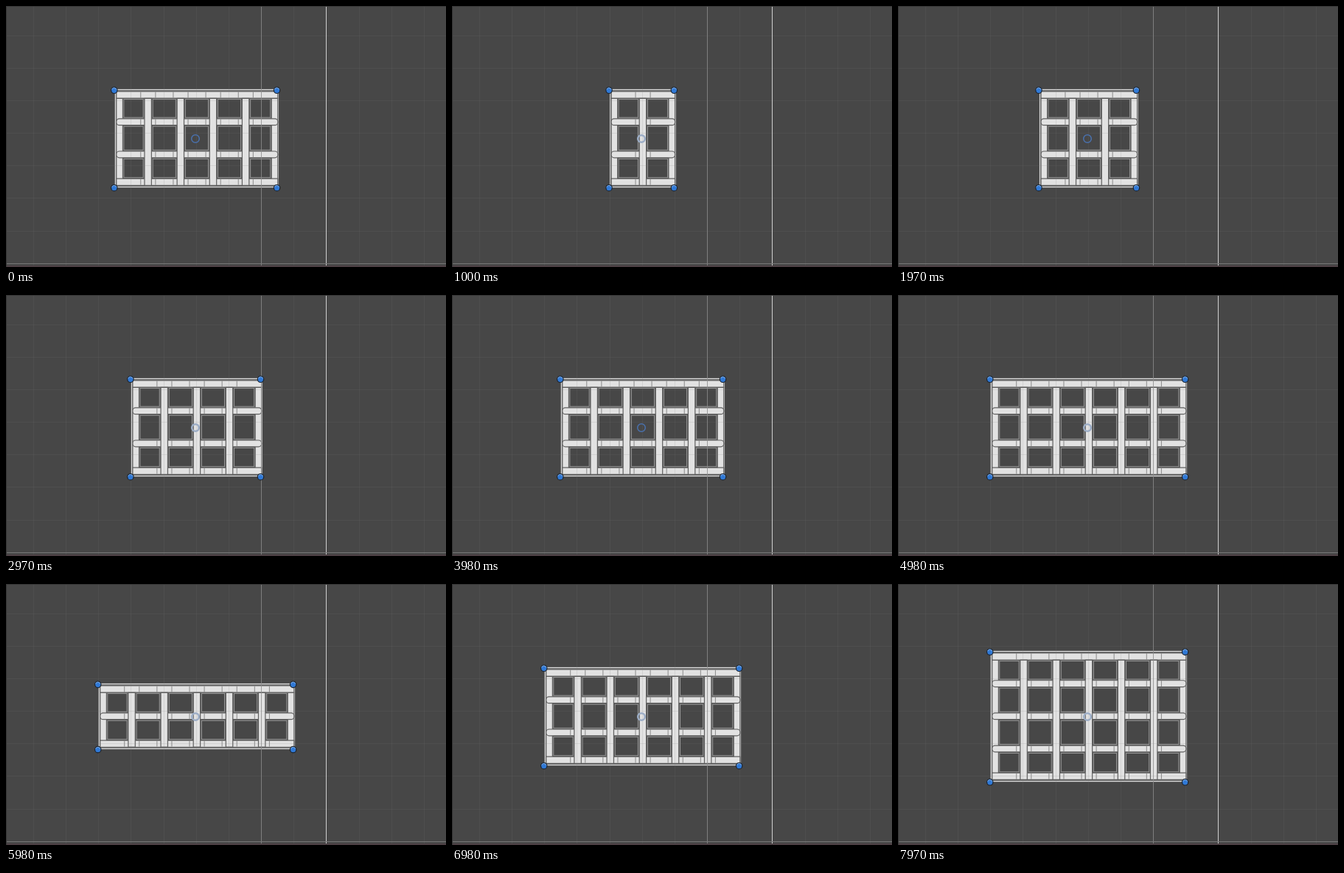
Write an HTML page with a canvas that moves like this. It is 597 px wide and 354 px high and loops after 8 s.

```html
<!DOCTYPE html>
<html>
<head>
<meta charset="utf-8">
<style>
html, body { margin: 0; width: 100%; height: 100%; overflow: hidden; background: #474747; }
canvas { display: block; }
</style>
</head>
<body>
<canvas id="stage" width="597" height="354"></canvas>
<script>
const ctx = document.getElementById('stage').getContext('2d');
const CELL = 44.15, CX = 257.2, CY = 180.5, LOOP = 8000;
const BG = '#474747', WOOD = '#e2e2e2', EDGE = '#606060';

// start time, columns, rows
const steps = [
  [0, 5, 3], [1000, 2, 3], [1970, 3, 3], [2970, 4, 3],
  [3980, 5, 3], [4980, 6, 3], [5980, 6, 2], [6980, 6, 3], [7970, 6, 4]
];

function rect(x, y, w, h, color) {
  ctx.fillStyle = color;
  ctx.fillRect(x, y, w, h);
}

function outline(x, y, w, h, color, width = 1) {
  ctx.strokeStyle = color;
  ctx.lineWidth = width;
  ctx.strokeRect(x, y, w, h);
}

function beam(x, y, w, h, radius = 0) {
  ctx.beginPath();
  ctx.roundRect(x, y, w, h, radius);
  ctx.fillStyle = WOOD;
  ctx.fill();
  ctx.strokeStyle = EDGE;
  ctx.lineWidth = 1.2;
  ctx.stroke();
}

function circle(x, y, r, stroke, width, fill) {
  ctx.beginPath();
  ctx.arc(x, y, r, 0, 2 * Math.PI);
  if (fill) { ctx.fillStyle = fill; ctx.fill(); }
  ctx.strokeStyle = stroke;
  ctx.lineWidth = width;
  ctx.stroke();
}

function grid() {
  const faint = 'rgba(120,120,120,.15)';
  for (let i = 0; i < 13; i++) {
    const x = Math.round(37 + i * CELL);
    if (i !== 7 && i !== 9) rect(x, 0, 1, 354, faint);
  }
  for (let i = 0; i < 7; i++) rect(0, Math.round(39.7 + i * CELL), 597, 1, faint);
  rect(346, 0, 1, 354, 'rgba(140,140,140,.8)');
  rect(434, 0, 1, 354, '#cfcfcf');
  rect(0, 349, 597, 1, '#777');
  rect(0, 352, 597, 2, '#4c4044');
  rect(0, 0, 597, 1, '#363636');
  rect(0, 0, 1, 354, '#363636');
}

function windowFrame(cols, rows) {
  const w = cols * CELL, h = rows * CELL;
  const x0 = CX - w / 2, y0 = CY - h / 2, x1 = x0 + w, y1 = y0 + h;
  const postX = k => x0 + k * CELL + 1.7;
  const railY = k => y0 + k * CELL - 1.2;

  rect(x0 + 1.5, y0 - 1, w + 0.5, h, EDGE);
  outline(x0 + 1.6, y0 - 0.8, w + 0.2, h - 0.4, '#dcdcdc', 1.3);

  // panes
  for (let c = 0; c < cols; c++) for (let r = 0; r < rows; r++) {
    const left = c ? postX(c) + 5.5 : x0 + 12;
    const right = c < cols - 1 ? postX(c + 1) - 5.5 : x1 - 7.8;
    const top = r ? railY(r) + 5 : y0 + 11.2;
    const bottom = r < rows - 1 ? railY(r + 1) - 5 : y1 - 13;
    rect(left, top, right - left, bottom - top, BG);
    outline(left + 1, top + 1, right - left - 2, bottom - top - 2, '#999');
  }

  beam(x0 + 3, y0 + 11, 8.6, h - 14.5);
  beam(x1 - 7.4, y0 + 11, 8.6, h - 14.5);
  beam(x0 + 3, y0 + 1.5, w - 1.8, 9.3);
  beam(x0 + 3, y1 - 12.6, w - 1.8, 9.2);
  for (let r = 1; r < rows; r++) beam(x0 + 3, railY(r) - 4.4, w - 1.8, 8.8, 4);

  for (let c = 1; c < cols; c++) {
    const x = postX(c);
    for (const dx of [-10.4, 9.7]) {
      rect(x + dx, y0 + 2, 1, 8.5, '#8a8a8a');
      rect(x + dx, y1 - 12, 1, 8, '#8a8a8a');
      for (let r = 1; r < rows; r++) rect(x + dx, railY(r) - 4, 1, 8, '#8a8a8a');
    }
    beam(x - 4.7, y0 + 11, 9.4, h - 14.5);
  }
  return [x0, y0, x1, y1];
}

function draw(now) {
  const t = now % LOOP;
  const [, cols, rows] = steps.findLast(s => s[0] <= t);
  rect(0, 0, 597, 354, BG);
  const [x0, y0, x1, y1] = windowFrame(cols, rows);
  grid();
  if (cols % 2 && rows % 2) circle(257, 180, 5.3, '#4a71ad', 1.5);
  else circle(257, 180, 4.8, '#9cadc6', 2.6);
  for (const x of [x0, x1]) for (const y of [y0, y1]) {
    circle(x, y, 4.2, '#1b2430', 1.2, '#3079d6');
    ctx.beginPath();
    ctx.arc(x, y, 3.2, 1.1 * Math.PI, 1.9 * Math.PI);
    ctx.strokeStyle = '#86b1e6';
    ctx.lineWidth = 1;
    ctx.stroke();
  }
  requestAnimationFrame(() => draw(performance.now()));
}
draw(0);
</script>
</body>
</html>
```
